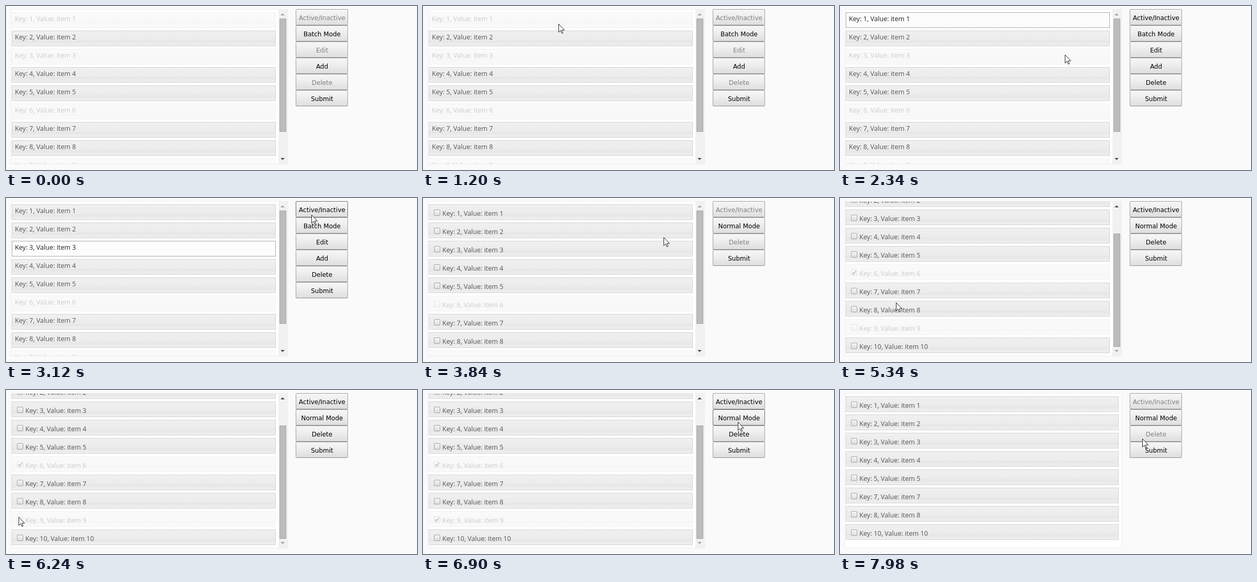
Animation, 786 px wide and 314 px high, one loop 8 s. Source, as an HTML page:

```html
<!DOCTYPE html>
<html lang="en">
<head>
<meta charset="utf-8">
<title>Item list</title>
<style>
* { box-sizing: border-box; }
html, body { margin: 0; width: 100%; height: 100%; overflow: hidden; background: #fafafa; }
div, button, i, span, svg { position: absolute; }
#list {
  left: 9px; top: 6px; width: 530px; height: 297px;
  overflow: hidden; background: #fff; border: 1px solid #eee;
}
.item {
  left: 1px; height: 30px; border: 1px solid #d3d3d3; color: #555;
  background: linear-gradient(#f0f0f0, #ebebeb 65%, #e6e6e6 65%, #efefef);
  font: 12.6px/18px "Open Sans", "Noto Sans", sans-serif; white-space: nowrap;
}
.item span { left: 5px; top: 3px; }
.batch .item span { left: 25px; top: 8px; }
.item.selected { background: #fcfcfc; border-color: #aaa; color: #212121; }
.item.inactive { opacity: .3; }
.box {
  left: 9px; top: 9px; width: 12px; height: 12px;
  border: 1px solid #a5a5a5; border-radius: 2px;
  background: linear-gradient(#f5f5f5, #dedede);
}
.box svg { left: 0; top: 0; width: 10px; height: 10px; fill: none; stroke: #333; stroke-width: 2; }
#bar { left: 521px; top: 7px; width: 17px; height: 295px; background: #f1f1f1; }
#thumb { left: 2px; width: 13px; height: 217px; background: #bcbcbc; border: 1px solid #a8a8a8; }
#thumb.hover { background: #a9a9a9; border-color: #979797; }
.arrow { left: 4px; border: 4px solid transparent; }
#up { top: 3px; border-bottom-color: currentColor; }
#down { top: 284px; border-top-color: currentColor; }
button {
  left: 554px; width: 100px; height: 31px; padding: 1px 0 0 1px;
  border: 1px solid #a0a0a0; border-bottom-color: #8c8c8c; border-radius: 2px;
  background: linear-gradient(#f6f6f6, #efefef 40%, #dedede);
  color: #000; font: 12px/28px "DejaVu Sans", sans-serif; text-align: center; white-space: nowrap;
}
button span { position: relative; top: 1px; }
button:disabled { color: #808080; }
button.hover { border-color: #707070; }
#cursor { left: 0; top: 0; width: 13px; height: 20px; }
</style>
</head>
<body>
<div id="list"></div>
<div id="bar">
  <i id="up" class="arrow"></i>
  <div id="thumb"></div>
  <i id="down" class="arrow"></i>
</div>
<div id="buttons"></div>
<svg id="cursor" viewBox="0 0 13 20">
  <path d="M.5 .5V16.2L4.1 12.8L6.5 18.4L8.7 17.5L6.4 12H11.4Z" fill="#fff" stroke="#1c1c2c"/>
</svg>
<script>
const LOOP = 8000, STEP = 60, ROW = 35, BUTTON = 31, SCROLL = 60;
const $ = id => document.getElementById(id);

const at = {
  select1: 1260, activate1: 1860, select3: 2640, activate3: 3060, batch: 3540,
  check6: 5100, scroll: 5220, check9: 6300, remove: 7380
};

// Pointer stops: arrival time and place
const onButton = i => ({ x: 590, y: 19 + BUTTON * i });
const onBox = (row, scroll) => ({ x: 24, y: 23 + ROW * row - scroll });
const stop = (t, place) => ({ t, ...place });
const stops = [
  stop(240, { x: 618, y: 208 }),
  stop(720, { x: 415, y: 128 }),
  stop(at.select1, { x: 250, y: 28 }),
  stop(1680, onButton(0)),
  stop(2340, { x: 430, y: 93 }),
  stop(3120, { x: 584, y: 32 }),
  stop(3480, onButton(1)),
  stop(4200, { x: 207, y: 122 }),
  stop(4500, { x: 191, y: 173 }),
  stop(4860, onBox(5, 0)),
  stop(5340, { x: 107, y: 200 }),
  stop(6000, { x: 32, y: 262 }),
  stop(6240, onBox(8, SCROLL)),
  stop(6900, { x: 602, y: 61 }),
  stop(7140, onButton(2)),
  stop(7740, { x: 578, y: 93 })
];

// Each move ends on time; longer ways start earlier, after a short rest.
function pointer(t) {
  if (t < stops[0].t) return null;
  const n = stops.findIndex(s => s.t > t);
  if (n < 0) return stops[stops.length - 1];
  const a = stops[n - 1], b = stops[n];
  const way = Math.hypot(b.x - a.x, b.y - a.y);
  const span = Math.min(b.t - a.t - STEP, 30 * Math.sqrt(way));
  const u = Math.max(0, 1 - (b.t - t) / span), k = u * u * (3 - 2 * u);
  return { x: Math.round(a.x + (b.x - a.x) * k), y: Math.round(a.y + (b.y - a.y) * k) };
}

function stateAt(t) {
  const past = name => t >= at[name];
  const batch = past("batch"), removed = past("remove");
  const checked = removed ? [] : [past("check6") && 6, past("check9") && 9].filter(Boolean);
  const selected = batch ? 0 : past("select3") ? 3 : past("select1") ? 1 : 0;
  return {
    batch, removed, checked, selected,
    inactive: [!past("activate1") && 1, !past("activate3") && 3, 6, 9],
    scroll: past("scroll") && !removed ? SCROLL : 0,
    armed: selected > 0 || checked.length > 0
  };
}

const inside = (p, x, y, w, h) =>
  p && p.x >= x && p.x < x + w && p.y >= y && p.y < y + h;

function itemHtml(key, row, s) {
  const cls = ["item", key === s.selected && "selected", s.inactive.includes(key) && "inactive"];
  const tick = s.checked.includes(key) ? '<svg><path d="M1.5 5L4 7.5L8.5 1.5"/></svg>' : "";
  const box = s.batch ? `<i class="box">${tick}</i>` : "";
  const pos = `top:${5 + ROW * row - s.scroll}px;width:${s.removed ? 522 : 505}px`;
  return `<div class="${cls.filter(Boolean).join(" ")}" style="${pos}">${box}<span>Key: ${key}, Value: item ${key}</span></div>`;
}

function buttonHtml(name, row, s, p) {
  const off = !s.armed && ["Active/Inactive", "Edit", "Delete"].includes(name);
  const y = 6 + BUTTON * row;
  const hover = !off && inside(p, 554, y, 100, BUTTON);
  return `<button class="${hover ? "hover" : ""}" style="top:${y}px" ${off ? "disabled" : ""}><span>${name}</span></button>`;
}

function render(t) {
  const s = stateAt(t), p = pointer(t);
  const keys = Array.from({ length: 10 }, (_, i) => i + 1)
    .filter(k => !s.removed || !s.inactive.includes(k));
  const names = s.batch
    ? ["Active/Inactive", "Normal Mode", "Delete", "Submit"]
    : ["Active/Inactive", "Batch Mode", "Edit", "Add", "Delete", "Submit"];

  $("list").className = s.batch ? "batch" : "";
  $("list").innerHTML = keys.map((k, i) => itemHtml(k, i, s)).join("");
  $("buttons").innerHTML = names.map((n, i) => buttonHtml(n, i, s, p)).join("");

  const top = s.scroll ? 61 : 17;
  $("bar").style.display = s.removed ? "none" : "";
  $("thumb").style.top = top + "px";
  $("thumb").className = inside(p, 523, 7 + top, 13, 217) ? "hover" : "";
  $("up").style.color = s.scroll ? "#505050" : "#a3a3a3";
  $("down").style.color = s.scroll ? "#a3a3a3" : "#505050";

  $("cursor").style.display = p ? "" : "none";
  if (p) $("cursor").style.transform = `translate(${p.x}px, ${p.y}px)`;
}

const start = performance.now();
let last = -1;
function frame() {
  const t = (performance.now() - start) % LOOP;
  const tick = Math.floor(t / STEP) * STEP;
  if (tick !== last) render(last = tick);
  requestAnimationFrame(frame);
}
frame();
</script>
</body>
</html>
```
